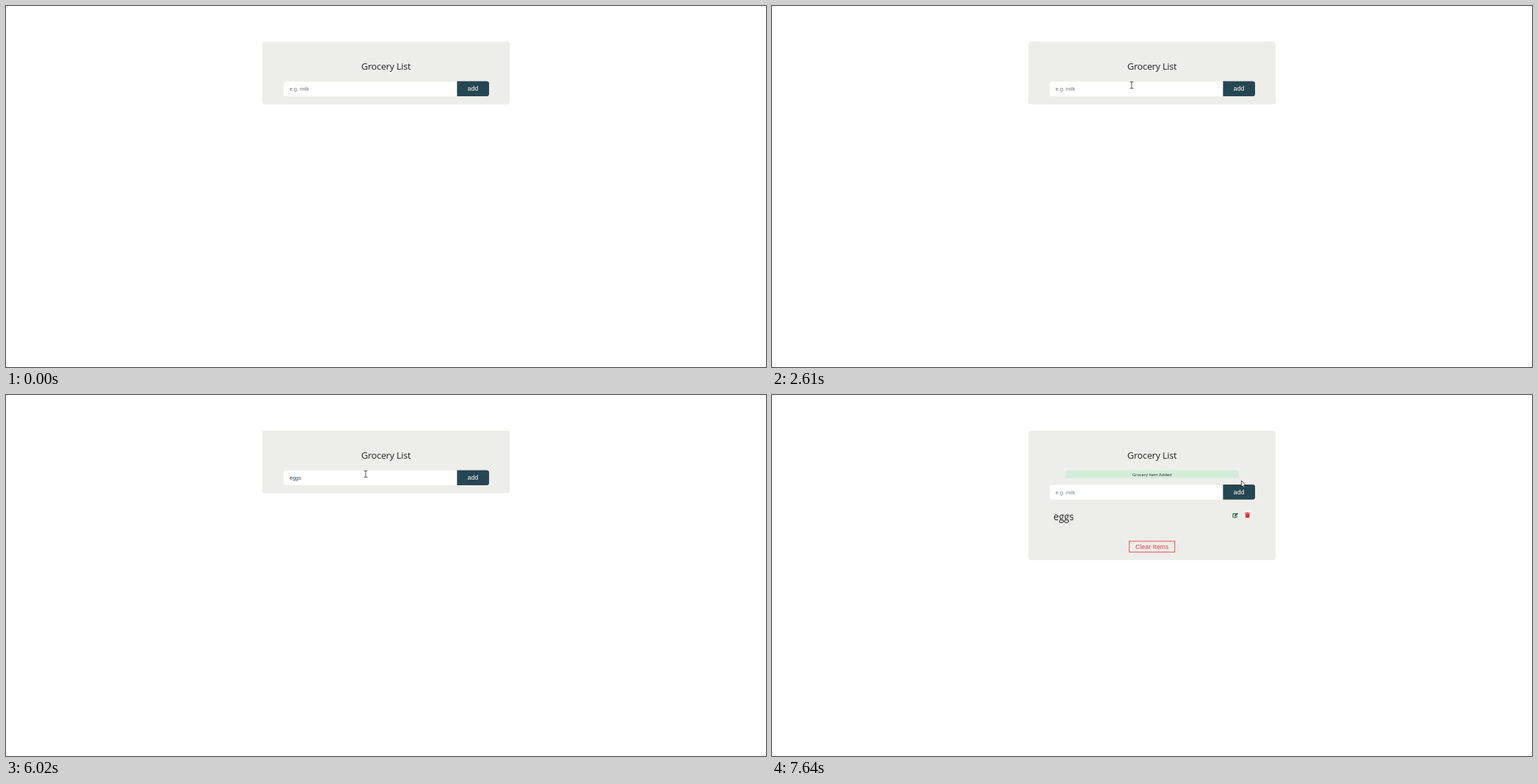
Animation, 1084 px wide and 516 px high, one loop 8000 ms. Source, as an HTML page:

```html
<!DOCTYPE html>
<html lang="en">
<head>
<meta charset="utf-8">
<title>Grocery List</title>
<style>
  html, body { margin: 0; width: 100%; height: 100%; overflow: hidden; background: #fff; }
  svg { display: block; }
  text { font-family: "Liberation Sans", Arial, sans-serif; }
  .ui { font-family: "Open Sans", "Noto Sans", sans-serif; fill: #222; }
  .mid { text-anchor: middle; }
  .field { font-size: 7.5px; }
  .button { font-size: 9.25px; }
</style>
</head>
<body>
<svg width="1084" height="516" viewBox="0 0 1084 516">
  <rect id="card" x="365.5" y="51" width="353" height="89.5" rx="4" fill="#edeee9"/>
  <text class="ui mid" x="542" y="91" font-size="13.2" letter-spacing="-.22">Grocery List</text>

  <g id="form">
    <path d="M643.5 108H399a3 3 0 0 0-3 3v15a3 3 0 0 0 3 3h244.500z" fill="#fff"/>
    <path d="M643.300 107.500H685.500a3.500 3.500 0 0 1 3.500 3.500v14.500a3.500 3.500 0 0 1-3.500 3.500H643.300z" fill="#264653"/>
    <text id="field" class="field" x="404.500" y="121"></text>
    <rect id="caret" y="114" width="1" height="9" fill="#264653"/>
    <text class="button mid" x="666" y="121.300" fill="#fff">add</text>
  </g>

  <g id="result">
    <rect x="418.500" y="107.500" width="247.500" height="11.500" rx="2.500" fill="#d4edda"/>
    <text class="ui mid" x="542" y="116" font-size="6">Grocery Item Added</text>
    <text class="ui" x="401.500" y="178.500" font-size="13.600">eggs</text>
    <g fill="none" stroke="#1c5a37">
      <path d="M661.500 169.500H657.500V175H663V172.500"/>
      <path d="M660 173L664 169" stroke-width="2"/>
    </g>
    <path d="M674.700 168.300H677l.4-.6h1.500l.4.6h2.200v1.100h-6.800zM675.200 170h5.900l-.4 5.400h-5.100z" fill="#e82634"/>
    <rect x="509.500" y="209" width="65" height="15.500" fill="none" stroke="#ef4f57"/>
    <text class="button mid" x="542" y="220" fill="#e8434e">Clear Items</text>
  </g>

  <circle id="click" r="6.700" fill="#f2e400" fill-opacity=".78"/>
  <g id="cursor">
    <path id="arrow" d="M.5.5V9.300L2.500 7.600 4 10.900 5.300 10.300 3.900 7.100H6.500Z" fill="#fff" stroke="#222" stroke-width=".8"/>
    <path id="beam" d="M-2.500-4.500H2.500M0-4.500V4.500M-2.500 4.500H2.500" fill="none" stroke="#444" stroke-width=".9"/>
  </g>
</svg>
<script>
const LOOP = 8000, TICK = 68, SUBMIT = 7640;
const $ = id => document.getElementById(id);
const show = (id, on) => $(id).setAttribute('display', on ? 'inline' : 'none');
const place = (id, x, y) => $(id).setAttribute('transform', `translate(${x} ${y})`);
const within = (t, spans) => spans.some(([from, to]) => t >= from && t < to);

// start time, ticks, destination x, y
const moves = [
  [440, 2, 800, 335],
  [770, 3, 587, 227],
  [1170, 9, 513, 113],
  [6088, 4, 597, 112],
  [6360, 4, 680, 115],
  [6900, 5, 669, 122]
];
const caretOn = [[2010, 2610], [3140, 3620], [4150, 4680], [4950, 6020], [6570, 7100]];
const clicks = [[2010, 2150], [7440, SUBMIT]];
const keys = [4950, 5150, 5350, 5420];

const ease = p => p < .5 ? (2 * p) ** 3.3 / 2 : 1 - (2 - 2 * p) ** 3.3 / 2;

function pointer(t) {
  let x = 904, y = 447;
  for (const [start, ticks, toX, toY] of moves) {
    if (t < start) break;
    const step = Math.min(ticks, Math.floor((t - start) / TICK) + 1);
    // the pointer first shows up at its starting place
    const p = start === 440 ? step - 1 : start > 6000 && start < 6900 ? step / ticks : ease(step / ticks);
    x += (toX - x) * p;
    y += (toY - y) * p;
  }
  return [x, y];
}

function draw() {
  const t = performance.now() % LOOP;
  const added = t >= SUBMIT;
  const typed = added ? '' : 'eggs'.slice(0, keys.filter(k => t >= k).length);
  const field = $('field');
  field.textContent = typed || 'e.g. milk';
  field.setAttribute('fill', typed ? '#264653' : added ? '#708791' : '#777');
  $('caret').setAttribute('x', 405 + (typed ? Math.round(field.getComputedTextLength()) : 0));
  show('caret', within(t, caretOn));

  $('card').setAttribute('height', added ? 185 : 89.5);
  place('form', 0, added ? 20.5 : 0);
  show('result', added);

  const [x, y] = pointer(t);
  const overField = y < 130 && x < 643;
  show('cursor', t >= 440);
  show('beam', overField);
  show('arrow', !overField);
  place('cursor', x, y);
  show('click', within(t, clicks));
  place('click', overField ? x : x - 1, y);
  requestAnimationFrame(draw);
}
draw();
</script>
</body>
</html>
```
